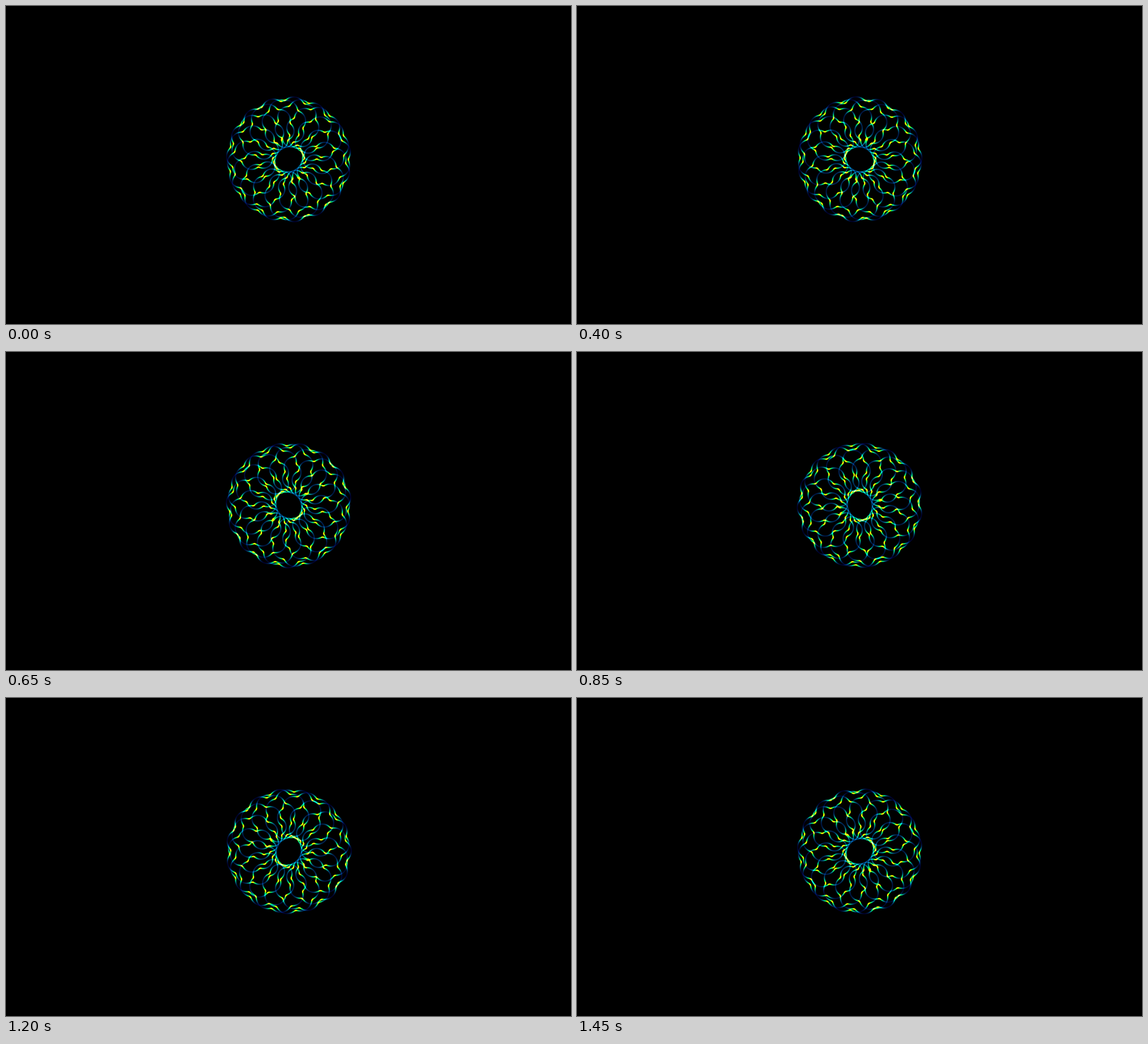
An HTML page with a canvas that plays this animation: 998 by 561 pixels, repeating every 1.5 s.

```html
<!DOCTYPE html>
<html lang="en">
<head>
<meta charset="utf-8">
<title>Rosette</title>
<style>
  html, body { margin: 0; width: 100%; height: 100%; overflow: hidden; background: #000; }
  canvas { display: block; }
</style>
</head>
<body>
<canvas id="stage" width="998" height="561"></canvas>
<script>
const ctx = document.getElementById('stage').getContext('2d');
const TAU = Math.PI * 2;
const SIZE = 240, LEFT = 379, TOP = 150;
const CENTER = { x: 499 - LEFT, y: 270 - TOP };
const LOOP = 1500, STEP = 50, POSES = 29;
const LOBES = 17, SCALLOPS = 8;
const ORBIT = 66, RING = 41.9, RIPPLE = 2.6;
const RING_RATE = LOBES + 1, RIPPLE_RATE = RING_RATE + LOBES * SCALLOPS - 2;
const MAX_SPEED = ORBIT + RING * RING_RATE + RIPPLE * RIPPLE_RATE;
const MIN_SPEED = RING * RING_RATE - RIPPLE * RIPPLE_RATE - ORBIT;
const SAMPLES = 30000, SIGMA = 0.75;

// Slowness to colour: [slowness, red, green, blue]
const RAMP = [
  [0, 0, 0, 48],
  [0.14, 0, 48, 98],
  [0.3, 0, 122, 138],
  [0.45, 0, 190, 118],
  [0.6, 0, 242, 70],
  [0.74, 140, 255, 0],
  [0.84, 250, 255, 0],
  [1, 255, 190, 0]
];

function rampColor(t) {
  const hi = Math.max(1, RAMP.findIndex(stop => stop[0] >= t));
  const a = RAMP[hi - 1], b = RAMP[hi];
  const mix = (t - a[0]) / (b[0] - a[0]);
  return [1, 2, 3].map(c => a[c] + (b[c] - a[c]) * mix);
}

const RAMP_STEPS = 256;
const palette = Array.from({ length: RAMP_STEPS + 1 }, (_, i) => rampColor(i / RAMP_STEPS));

const light = new Float32Array(SIZE * SIZE * 3);
const image = ctx.createImageData(SIZE, SIZE);
const bell = d => Math.exp(-d * d / (2 * SIGMA * SIGMA));
const wx = new Float32Array(5);

function splat(x, y, color, weight) {
  const px = Math.round(x), py = Math.round(y);
  for (let i = 0; i < 5; i++) wx[i] = bell(px + i - 2 - x);
  for (let j = -2; j <= 2; j++) {
    const wy = weight * bell(py + j - y);
    let at = ((py + j) * SIZE + px - 2) * 3;
    for (let i = 0; i < 5; i++) {
      const w = wy * wx[i];
      light[at++] += w * color[0];
      light[at++] += w * color[1];
      light[at++] += w * color[2];
    }
  }
}

// One closed curve: a turning ring carried on an orbit, with a ripple on the ring.
// It glows brighter and warmer where the pen moves slowly.
function trace(phase) {
  const apex = -TAU / 4 - phase * TAU / LOBES;
  const axis = phase * TAU / 2;
  const step = TAU / SAMPLES;
  for (let n = 0; n < SAMPLES; n++) {
    const theta = n * step;
    const turn = LOBES * (theta - apex);
    const ring = theta + turn;
    const ripple = ring + SCALLOPS * turn - 2 * (theta - axis);
    const ox = ORBIT * Math.cos(theta), oy = ORBIT * Math.sin(theta);
    const rx = RING * Math.cos(ring), ry = RING * Math.sin(ring);
    const wx = -RIPPLE * Math.cos(ripple), wy = -RIPPLE * Math.sin(ripple);
    const speed = Math.hypot(
      ox + RING_RATE * rx + RIPPLE_RATE * wx,
      oy + RING_RATE * ry + RIPPLE_RATE * wy
    );
    const raw = (MAX_SPEED - speed) / (MAX_SPEED - MIN_SPEED);
    const slowness = Math.min(1, Math.max(0, raw));
    const weight = speed * step / (SIGMA * Math.sqrt(TAU)) * (1 + 0.7 * slowness);
    const color = palette[Math.round(slowness * RAMP_STEPS)];
    splat(CENTER.x + ox + rx + wx, CENTER.y + oy + ry + wy, color, weight);
  }
}

function draw(pose) {
  light.fill(0);
  trace((pose - 4) / POSES);
  const data = image.data;
  for (let i = 0; i < SIZE * SIZE; i++) {
    for (let c = 0; c < 3; c++) data[i * 4 + c] = light[i * 3 + c];
    data[i * 4 + 3] = 255;
  }
  ctx.putImageData(image, LEFT, TOP);
}

ctx.fillRect(0, 0, 998, 561);
const start = performance.now();
let shown = -1;

function tick() {
  const time = (performance.now() - start) % LOOP;
  const pose = Math.max(0, Math.floor(time / STEP) - 1);
  if (pose !== shown) draw(shown = pose);
  requestAnimationFrame(tick);
}
tick();
</script>
</body>
</html>
```
